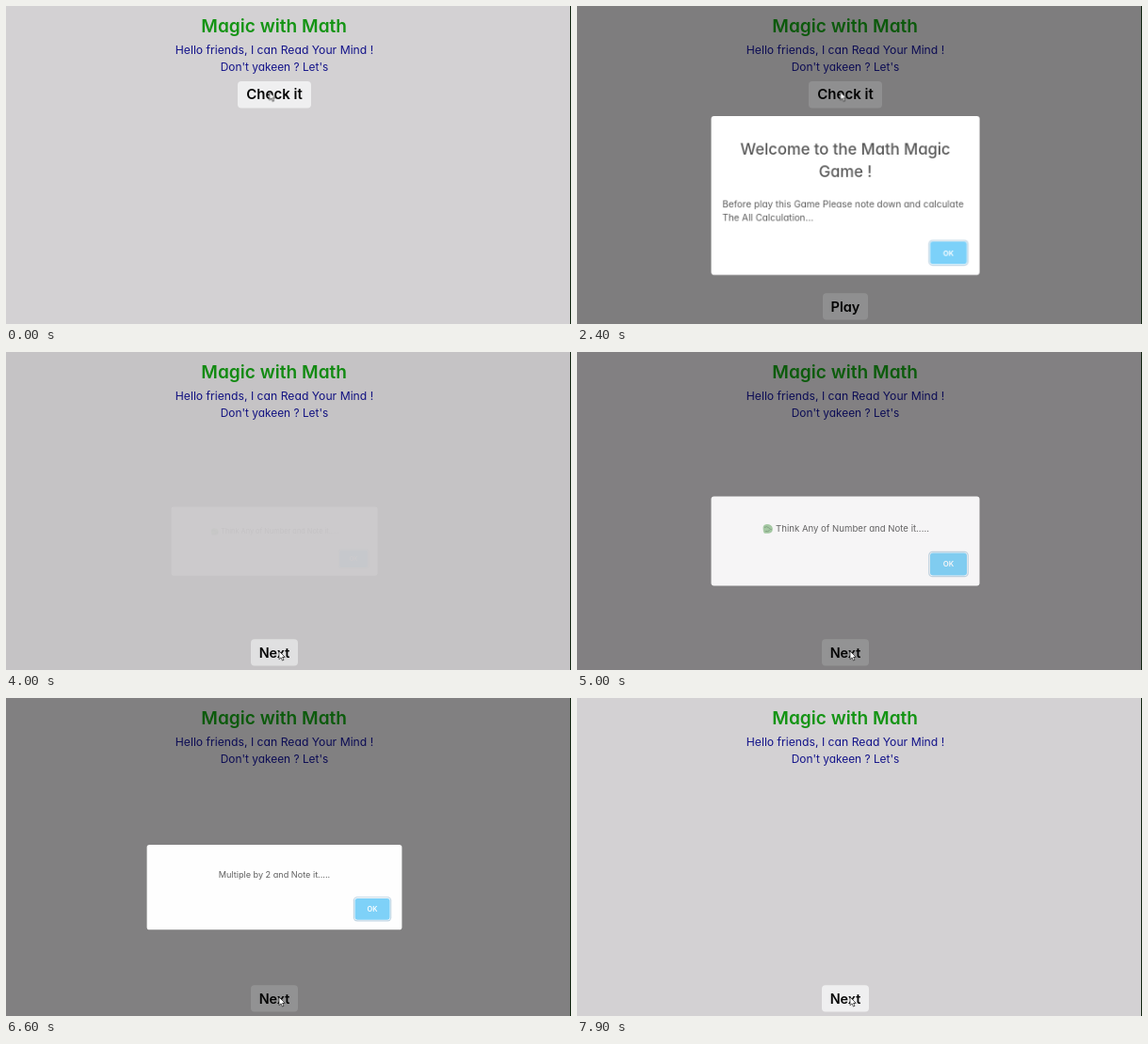
Animation, 600 px wide and 338 px high, one loop 8000 ms. Source, as an HTML page:

```html
<!DOCTYPE html>
<html lang="en">
<head>
<meta charset="utf-8">
<title>Magic with Math</title>
<style>
  html, body { margin: 0; width: 100%; height: 100%; overflow: hidden; background: #d3d1d3; }
  svg { display: block; width: 100vw; height: 100vh; }
  text {
    font-family: Inter, "Open Sans", sans-serif;
    font-feature-settings: "cv11";
    text-anchor: middle;
  }
  .title { font-size: 19.1px; font-weight: 600; fill: #149414; }
  .line { fill: #14148a; }
  .btn rect { fill: #efeff0; }
  .btn text { font-weight: 600; fill: #060606; }
  .overlay, .modal { opacity: 0; }
  .modal { transform-origin: 285px 201.2px; }
  .modal .head { font-size: 16.6px; font-weight: 500; fill: rgba(0, 0, 0, .65); }
  .modal .body { font-size: 9.9px; fill: rgba(0, 0, 0, .64); }
  .modal .note { font-size: 9.6px; fill: rgba(0, 0, 0, .64); }
  .modal .left { text-anchor: start; }
  .ok { font-size: 7.8px; font-weight: 600; fill: #fff; }
</style>
</head>
<body>
<svg viewBox="0 0 600 338" preserveAspectRatio="none">
  <defs>
    <g id="ok">
      <rect x="373.2" y="-1.8" width="42.6" height="27.6" rx="4.4" fill="#c2d7e5"/>
      <rect x="374.4" y="-.6" width="40.2" height="25.2" rx="3.4" fill="#fff"/>
      <rect x="375" width="39" height="24" rx="3" fill="#7cd1f9"/>
      <text class="ok" x="394.4" y="14.9">OK</text>
    </g>
  </defs>

  <rect width="600" height="338" fill="#d3d1d3"/>
  <text class="title" x="284.7" y="27.6">Magic with Math</text>
  <text class="line" x="285" y="50.6" font-size="12.2">Hello friends, I can Read Your Mind !</text>
  <text class="line" x="285" y="68.8" font-size="11.9">Don't yakeen ? Let's</text>

  <g class="btn" id="check">
    <rect x="246" y="80" width="78" height="28.4" rx="4"/>
    <text x="285" y="99.4" font-size="15">Check it</text>
  </g>
  <g class="btn" id="play">
    <rect x="261" y="305.3" width="48" height="28.2" rx="4"/>
    <text x="285" y="324.7" font-size="14.6">Play</text>
  </g>
  <g class="btn" id="next">
    <rect x="260" y="305.3" width="50" height="28.2" rx="4"/>
    <text x="285" y="324.7" font-size="14.4">Next</text>
  </g>

  <g class="overlay">
    <rect width="600" height="338" fill="#000" fill-opacity=".4"/>
    <g class="modal">
      <rect x="142.5" y="117" width="285" height="168.8" rx="3" fill="#fff"/>
      <text class="head" x="285" y="157.8">Welcome to the Math Magic</text>
      <text class="head" x="285" y="181.6">Game !</text>
      <text class="body left" x="154.4" y="213.8">Before play this Game Please note down and calculate</text>
      <text class="body left" x="154.4" y="228.2">The All Calculation...</text>
      <use href="#ok" y="250.4"/>
    </g>
  </g>

  <g class="overlay">
    <rect width="600" height="338" fill="#000" fill-opacity=".4"/>
    <g class="modal">
      <rect x="142.5" y="153.6" width="285" height="95" rx="3" fill="#fff"/>
      <g opacity=".75">
        <path d="M197.6 188q-.6-4.5 4-5 5.500 0 6.200 4.500 .2 5-4.300 5.200h-4.500q-1.400-1.500-1.400-4.700z" fill="#86bd84"/>
        <path d="M199 186.500q2.500-1.800 4.500.3t3.300 2M200 190.500q2.500 1 4.500-1" fill="none" stroke="#47754b" stroke-width=".8"/>
      </g>
      <text class="note" x="292.500" y="191">Think Any of Number and Note it.....</text>
      <use href="#ok" y="213.5"/>
    </g>
  </g>

  <g class="overlay">
    <rect width="600" height="338" fill="#000" fill-opacity=".4"/>
    <g class="modal">
      <rect x="142.5" y="153.6" width="285" height="95" rx="3" fill="#fff"/>
      <text class="note" x="285" y="191">Multiple by 2 and Note it.....</text>
      <use href="#ok" y="213.5"/>
    </g>
  </g>

  <g id="cursor">
    <path d="M0 0V8.600L2.100 6.800 3.500 10 5 9.300 3.600 6.300H6.300Z" fill="#fff" stroke="#222" stroke-width=".7" stroke-linejoin="round"/>
  </g>
  <rect x="599" width="1" height="338" fill="#10240f"/>
</svg>
<script>
const LOOP = 8000;
const $ = s => document.querySelector(s);
const $$ = s => [...document.querySelectorAll(s)];

// steps: [ms, value, easing towards the next step]
function run(el, prop, steps) {
  const first = steps[0][1], last = steps[steps.length - 1][1];
  const all = [...steps, [LOOP, last]];
  if (steps[0][0] > 0) all.unshift([0, first, "step-end"]);
  const frames = all.map(([ms, value, easing = "linear"]) =>
    ({ offset: ms / LOOP, [prop]: value, easing }));
  const anim = el.animate(frames, { duration: LOOP, iterations: Infinity });
  anim.startTime = 0 + start;
}

const start = document.timeline.currentTime || 0;

const fade = (el, open, close, ms) => run(el, "opacity", [
  [open, 0, "ease"], [open + ms, 1], [close, 1, "ease"], [close + ms, 0]
]);

// pop-in: grow past full size, dip, settle
const pop = (el, open) => run(el, "transform",
  [[.01, .5], [.45, 1.05], [.8, .95], [1, 1]]
    .map(([p, s]) => [open + p * 300, `scale(${s})`, "ease"]));

const show = (el, ...steps) =>
  run(el, "opacity", steps.map(([ms, on]) => [ms, on, "step-end"]));

const dialogs = [[1235, 2560], [3960, 4985], [6360, 7460]];
const overlays = $$(".overlay"), modals = $$(".modal");
dialogs.forEach(([open, close], i) => {
  fade(overlays[i], open, close, 300);
  fade(modals[i], open, close, 200);
  pop(modals[i], open);
});

show($("#check"), [0, 1], [3960, 0]);
show($("#play"), [0, 0], [1235, 1], [3960, 0]);
show($("#next"), [0, 0], [3960, 1]);

const at = (x, y) => `translate(${x}px, ${y}px)`;
run($("#cursor"), "transform", [
  [0, at(279.6, 91.4)],
  [2780, at(279.6, 91.4), "ease-in-out"],
  [3150, at(296, 316)],
  [3450, at(296, 316), "ease-in-out"],
  [3800, at(290, 318)]
]);
</script>
</body>
</html>
```
